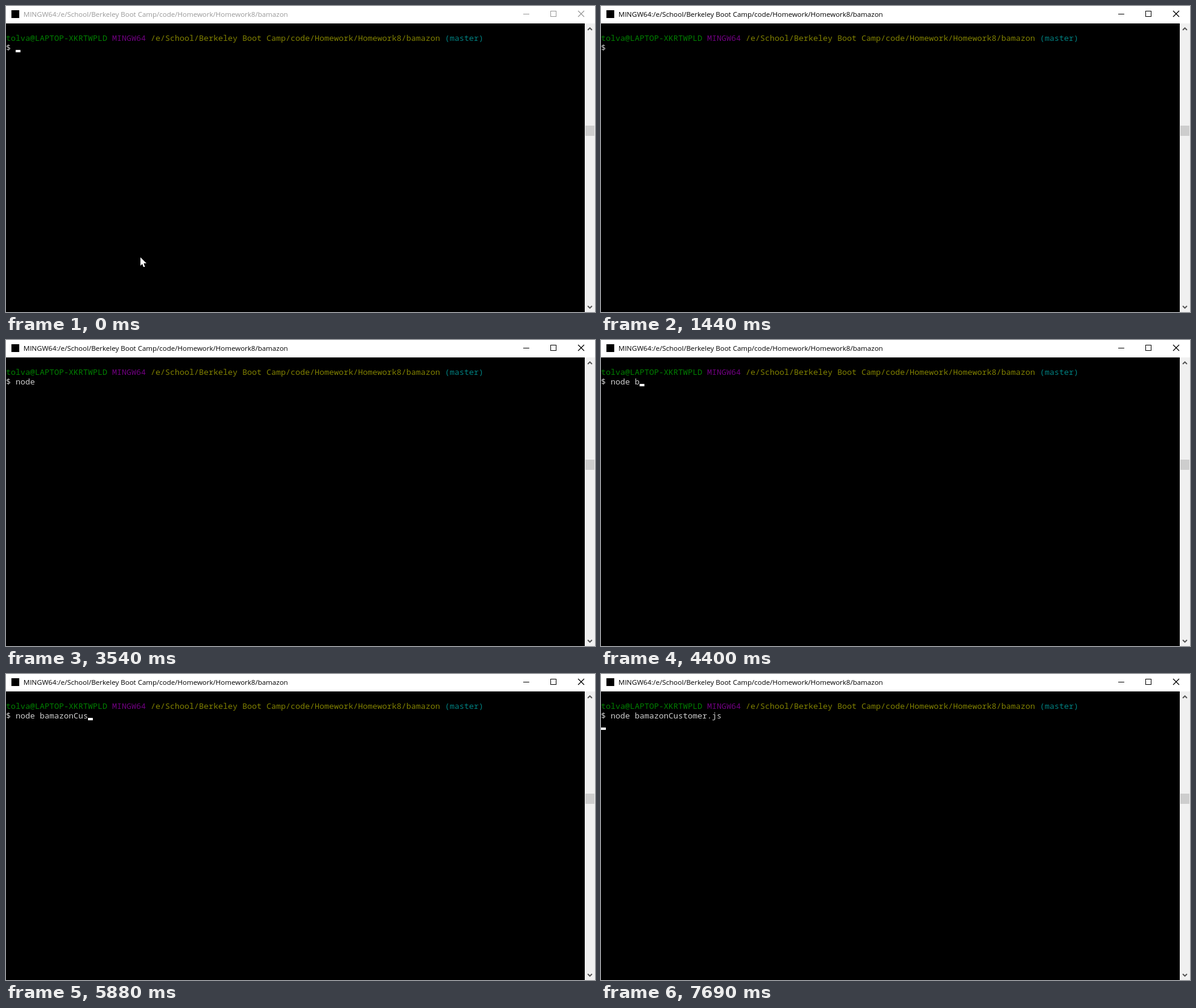
Write an HTML page with a canvas that moves like this. It is 977x509 px and loops after 8000 ms.

```html
<!DOCTYPE html>
<html lang="en">
<head>
<meta charset="utf-8">
<title>Terminal</title>
<style>
  html, body { margin: 0; width: 100%; height: 100%; overflow: hidden; background: #000; }
  canvas { display: block; }
</style>
</head>
<body>
<canvas id="stage" width="977" height="509"></canvas>
<script>
const canvas = document.getElementById('stage');
const ctx = canvas.getContext('2d', { alpha: false });
const { width: W, height: H } = canvas;
const LOOP = 8000, CELL = 8, TOP = 29, ROW = 16;
const PATH = '/e/School/Berkeley Boot Camp/code/Homework/Homework8/bamazon';
const PROMPT = [
  ['tolva@LAPTOP-XKRTWPLD', '#008000'],
  ['MINGW64', '#700080'],
  [PATH, '#808000'],
  ['(master)', '#008080']
];

// Bursts of even typing: text, first key, last key
const BURSTS = [
  ['node ', 2490, 3040],
  ['bama', 4400, 4810],
  ['zon', 5000, 5210],
  ['Customer', 5655, 6330],
  ['.', 6520, 6520],
  ['js', 6770, 6890]
];
const KEYS = BURSTS.flatMap(([text, from, to]) =>
  [...text].map((ch, i) => ({ ch, at: from + (to - from) * i / Math.max(1, text.length - 1) })));
const ENTER = 7690, FOCUS = 400;
const BLINK_START = 920, BLINK = 515;

const ticks = t => Math.floor((t - BLINK_START) / BLINK);

function rect(x, y, w, h, color) {
  ctx.fillStyle = color;
  ctx.fillRect(x, y, w, h);
}

function line(points, color, width) {
  ctx.strokeStyle = color;
  ctx.lineWidth = width;
  ctx.beginPath();
  points.forEach(([x, y]) => ctx.lineTo(x, y));
  ctx.stroke();
}

function cells(col, row, text, color) {
  ctx.font = '13.333px "Noto Sans Mono", monospace';
  ctx.fillStyle = color;
  [...text].forEach((ch, i) => ctx.fillText(ch, (col + i) * CELL, TOP + row * ROW + 13));
}

function titleBar(t) {
  const ink = t < FOCUS ? '#999' : '#000';
  rect(0, 0, W, TOP, '#fff');
  rect(9, 7, 13, 13, '#000');
  ctx.font = '11.53px "Open Sans", sans-serif';
  ctx.fillStyle = ink;
  ctx.fillText('MINGW64:' + PATH, 29, 18);
  rect(858, 13, 10, 1, ink);
  ctx.strokeStyle = ink;
  ctx.lineWidth = 1;
  ctx.strokeRect(903.5, 8.5, 9, 9);
  line([[949, 8], [959, 18]], ink, 1.2);
  line([[959, 8], [949, 18]], ink, 1.2);
}

function scrollBar() {
  const x = W - 17;
  rect(x, TOP, 17, H - TOP, '#f0f0f0');
  rect(x + 1, 199, 15, 17, '#cdcdcd');
  const arrow = (y, dy) => line([[x + 5, y], [x + 8.5, y + dy], [x + 12, y]], '#505050', 1.8);
  arrow(40, -3.5);
  arrow(499, 3.5);
}

function terminal(t) {
  let col = 0;
  for (const [text, color] of PROMPT) {
    cells(col, 1, text, color);
    col += text.length + 1;
  }
  const typed = KEYS.filter(k => k.at <= t);
  const input = '$ ' + typed.map(k => k.ch).join('');
  cells(0, 2, input, '#ccc');

  // Each key shows the caret again, each tick toggles it
  const lastKey = typed.length ? typed[typed.length - 1].at : BLINK_START;
  const entered = t >= ENTER;
  if (entered || (ticks(t) - ticks(lastKey)) % 2 === 0) {
    const [x, row] = entered ? [0, 3] : [input.length, 2];
    rect(x * CELL, TOP + (row + 1) * ROW - 4, CELL, 4, '#fff');
  }
}

// Three quick steps up to the right, then a jump on the way out
function pointer(t) {
  if (t >= 630) return;
  const p = Math.min(3, Math.max(0, Math.floor((t - 15) / 45))) / 3;
  const [x, y] = t < 580 ? [223 + 70 * p, 418 - 77 * p] : [242, 376];
  ctx.fillStyle = '#fff';
  ctx.beginPath();
  [[0, 0], [0, 14], [3, 11], [5, 16], [7.5, 16], [5.5, 10], [10, 10]]
    .forEach(([dx, dy]) => ctx.lineTo(Math.round(x) + dx, Math.round(y) + dy));
  ctx.fill();
}

function draw(t) {
  rect(0, 0, W, H, '#000');
  titleBar(t);
  scrollBar();
  terminal(t);
  pointer(t);
}

const start = performance.now();
function tick() {
  draw((performance.now() - start) % LOOP);
  requestAnimationFrame(tick);
}
tick();
</script>
</body>
</html>
```
